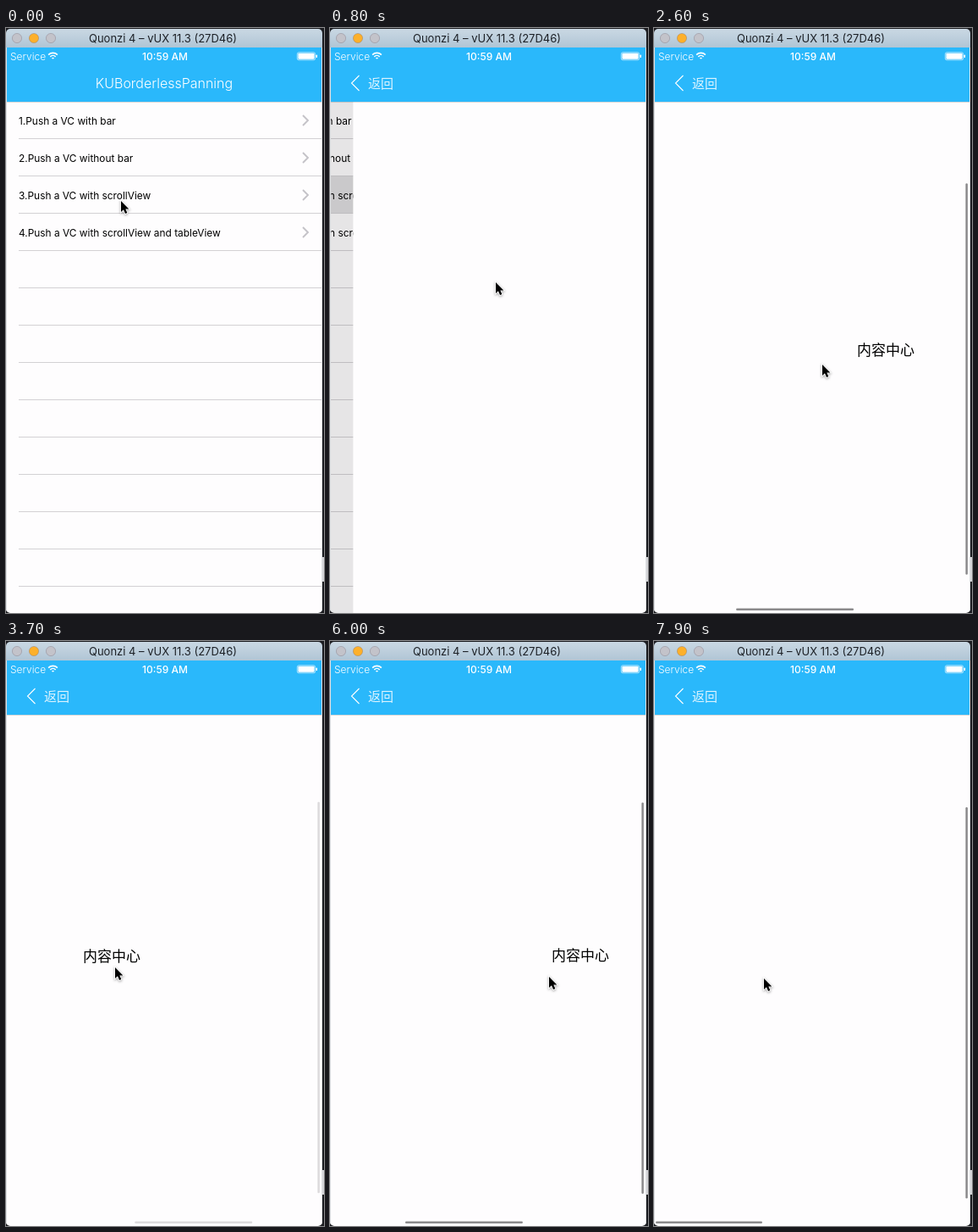
These frames come from a looping animation (376 px wide and 690 px high, 8 s). An HTML page with a canvas:

```html
<!DOCTYPE html>
<html lang="en">
<head>
<meta charset="utf-8">
<title>Scroll view demo</title>
<style>
  html, body { margin: 0; width: 376px; height: 690px; overflow: hidden; background: #1b1c20; }
  canvas { display: block; }
</style>
</head>
<body>
<canvas id="stage" width="376" height="690"></canvas>
<script>
const ctx = document.getElementById('stage').getContext('2d');
const LOOP = 8000, REST = 300;
const RIGHT = 374, TOP = 87, HEIGHT = 603, ROW = 44;
const PAPER = '#fefdfe';
const LATIN = 'Inter, sans-serif';
const HAN = '"Noto Sans CJK SC", "Noto Sans CJK", sans-serif';
const ROWS = ['bar', 'without bar', 'scrollView', 'scrollView and tableView']
  .map((end, i) => `${i + 1}.Push a VC ${i === 1 ? '' : 'with '}${end}`);

// Each drag ends with the pointer and the scrolled label at these places
const START = 497;
const POSES = [
  { at: 0, pointer: [136, 204], label: [START, START] },
  { at: 800, pointer: [196, 300], label: [START, START] },
  { at: 2600, pointer: [199, 397], label: [240, 380] },
  { at: 3700, pointer: [129, 385], label: [91, 372] },
  { at: 5100, pointer: [143, 390], label: [30, 373] },
  { at: 6000, pointer: [259, 396], label: [262, 371] },
  { at: 7900, pointer: [130, 398], label: [510, 364] }
];

const clamp = v => Math.min(1, Math.max(0, v));

// Rest briefly in each pose, then ease to the next one
function place(part, t) {
  const i = POSES.findLastIndex(pose => pose.at <= t);
  const a = POSES[i], b = POSES[i + 1];
  if (!b) return a[part];
  const u = clamp((t - a.at - REST) / (b.at - a.at - REST));
  const e = u * u * (3 - 2 * u);
  return a[part].map((v, n) => v + (b[part][n] - v) * e);
}

// Critically damped spring, settled by the end of the transition
function pushProgress(t) {
  const x = Math.max(0, t - 450) / 1000 * 12.2;
  return t >= 1000 ? 1 : 1 - (1 + x) * Math.exp(-x);
}

// Scroll bars show from the first drag and fade around the pause
function barAlpha(t) {
  return clamp((t - 1150) / 100) * clamp((Math.abs(t - 3960) - 200) / 200);
}

function rect(x, y, w, h, color) {
  ctx.fillStyle = color;
  ctx.fillRect(x, y, w, h);
}

function pill(x, y, w, h, r, color) {
  ctx.fillStyle = color;
  ctx.beginPath();
  ctx.roundRect(x, y, w, h, r);
  ctx.fill();
}

function text(str, x, y, font, color, align = 'left') {
  ctx.font = font;
  ctx.fillStyle = color;
  ctx.textAlign = align;
  ctx.fillText(str, x, y);
}

// Angle pointing left (-1) or right (1), with its tip at x, y
function chevron(x, y, w, h, dir, color, width) {
  ctx.strokeStyle = color;
  ctx.lineWidth = width;
  ctx.beginPath();
  ctx.moveTo(x - dir * w, y - h);
  ctx.lineTo(x, y);
  ctx.lineTo(x - dir * w, y + h);
  ctx.stroke();
}

function titleBar() {
  const g = ctx.createLinearGradient(0, 0, 0, 23);
  g.addColorStop(0, '#cbd9e4');
  g.addColorStop(1, '#b0c5d5');
  rect(0, 0, RIGHT, 23, g);
  ['#c3c3ca', '#fdb02b', '#c3c3ca'].forEach((color, i) => {
    ctx.beginPath();
    ctx.arc(13 + i * 20, 12, 5.6, 0, 7);
    ctx.fillStyle = color;
    ctx.fill();
    ctx.strokeStyle = 'rgba(90,60,70,.3)';
    ctx.lineWidth = 0.8;
    ctx.stroke();
  });
  text('Quonzi 4 – vUX 11.3 (27D46)', 185.5, 17, `13px ${LATIN}`, '#1c2026', 'center');
}

function wifi(x, y) {
  ctx.strokeStyle = '#fff';
  ctx.lineWidth = 1.6;
  for (const r of [1.4, 4.5, 7.6]) {
    ctx.beginPath();
    ctx.arc(x, y, r, -Math.PI * 0.75, -Math.PI * 0.25);
    ctx.stroke();
  }
}

function statusBar() {
  text('Service', 5, 37.5, `300 12px ${LATIN}`, '#fff');
  text('10:59 AM', 188, 37.5, `500 12px ${LATIN}`, '#fff', 'center');
  wifi(55.5, 37);
  ctx.lineWidth = 0.6;
  ctx.beginPath();
  ctx.roundRect(344.3, 28.8, 21.4, 9, 2);
  ctx.stroke();
  pill(345.4, 29.8, 19.2, 7, 1, '#fff');
  pill(366.5, 31.5, 1.5, 3.6, 0.7, '#fff');
}

function navBar(p) {
  rect(0, 23, RIGHT, TOP - 23, '#2ab8fb');
  rect(0, TOP, RIGHT, 0.5, 'rgba(0,0,0,.3)');
  statusBar();
  ctx.globalAlpha = clamp(1 - p * 1.4);
  text('KUBorderlessPanning', 187 - 130 * p, 71, `300 16px ${LATIN}`, '#fff', 'center');
  ctx.globalAlpha = clamp(p * 1.1);
  chevron(25.5, 65, 9, 9, -1, '#fff', 1.1);
  text('返回', 45, 70.5, `300 15px ${HAN}`, 'rgba(255,255,255,.85)');
  ctx.globalAlpha = 1;
}

function list(p, selected) {
  ctx.save();
  ctx.translate(-112.5 * p, 0);
  rect(0, TOP, RIGHT, HEIGHT, PAPER);
  if (selected) rect(0, TOP + 2 * ROW, RIGHT, ROW, '#dfdee0');
  for (let y = TOP + ROW - 1; y < 690; y += ROW) rect(15, y, RIGHT - 15, 1, '#d3d1d4');
  ROWS.forEach((label, i) => {
    const y = 109 + i * ROW;
    text(label, 15, y + 4.5, `11.9px ${LATIN}`, '#000');
    chevron(357, y, 6, 6, 1, '#c4c3c8', 1.9);
  });
  ctx.restore();
  rect(0, TOP, RIGHT, HEIGHT, `rgba(0,0,0,${0.1 * p})`);
}

function scrollView(left, t) {
  rect(left, TOP, RIGHT - left, HEIGHT, PAPER);
  const [x, y] = place('label', t);
  text('内容中心', left + x, y + 6.2, `17px ${HAN}`, '#000');
  ctx.globalAlpha = barAlpha(t);
  const overscroll = Math.max(0, x - START);
  const barX = 2 + Math.max(0, START - x) * 0.37;
  const barY = 89 + (START - y) * 0.805;
  pill(barX, 684.4, 139 - overscroll, 2.5, 1.25, '#8b8a8c');
  pill(368.4, barY, 2.5, 461.5, 1.25, '#8b8a8c');
  ctx.globalAlpha = 1;
}

function pointer(x, y) {
  ctx.save();
  ctx.translate(x, y);
  ctx.scale(0.92, 0.92);
  const arrow = new Path2D('M0 0V14.2L3.2 11.2L5.5 16.4L8 15.3L5.8 10.3H10.2Z');
  ctx.shadowColor = 'rgba(0,0,0,.4)';
  ctx.shadowBlur = 3;
  ctx.shadowOffsetY = 1;
  ctx.strokeStyle = '#fff';
  ctx.lineWidth = 1.8;
  ctx.stroke(arrow);
  ctx.shadowColor = 'transparent';
  ctx.fillStyle = '#000';
  ctx.fill(arrow);
  ctx.restore();
}

function draw(t) {
  const p = pushProgress(t);
  rect(0, 0, 376, 690, '#1b1c20');
  rect(RIGHT, 624, 2, 29, '#d5d5d8');
  ctx.save();
  ctx.beginPath();
  ctx.roundRect(0, 1, RIGHT, 689, 5);
  ctx.clip();
  if (p < 1) list(p, t >= 300);
  if (p > 0) scrollView(375 * (1 - p), t);
  navBar(p);
  titleBar();
  for (const x of [0, RIGHT - 1]) rect(x, 23, 1, 667, '#dfe1e4');
  ctx.restore();
  pointer(...place('pointer', t));
}

function tick() {
  draw(performance.now() % LOOP);
  requestAnimationFrame(tick);
}
tick();
</script>
</body>
</html>
```
